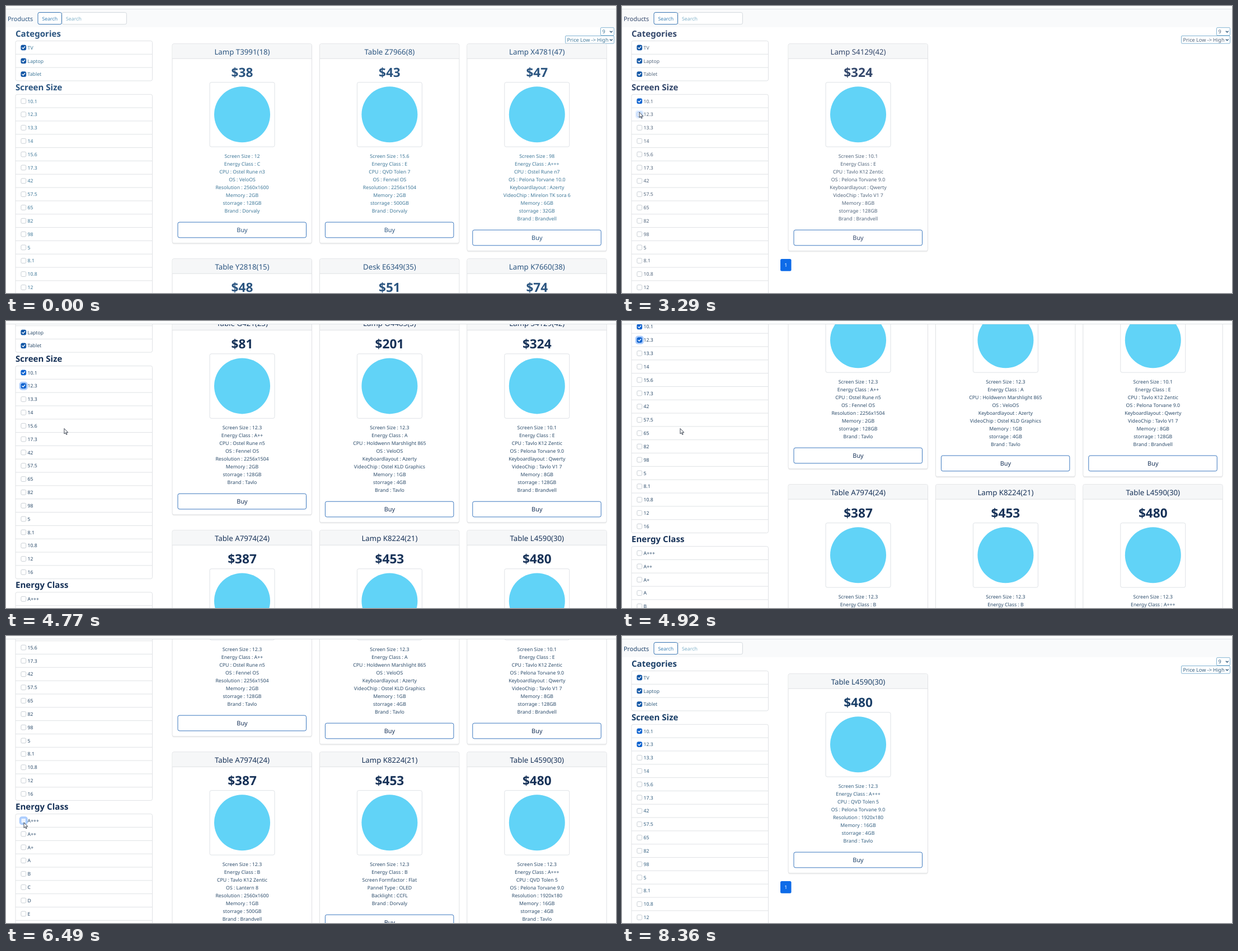
An HTML page for the animation above (9440 ms loop, 1090x514 px).

```html
<!DOCTYPE html>
<html lang="en">
<head>
<meta charset="utf-8">
<title>Product filter</title>
<style>
html, body { margin: 0; width: 100%; height: 100%; overflow: hidden; background: #fff; }
svg { display: block; width: 1090px; height: 514px; }
text { font-family: "Noto Sans", "Open Sans", sans-serif; fill: var(--small); text-rendering: geometricPrecision; }
.title { font-size: 13.25px; fill: var(--main); }
.price { font-size: 22.6px; font-weight: 600; fill: var(--main); }
.spec { font-size: 8.75px; }
.buy { font-size: 10.9px; fill: var(--main); }
.head { font-size: 15.1px; font-weight: 600; fill: var(--main); }
.label { font-size: 8.7px; }
.brand { font-size: 10.9px; fill: var(--main); }
.nav { font-size: 8.8px; fill: #3d82b6; }
.hint { font-size: 8.8px; fill: #7fb0c8; }
.pick { font-size: 9.15px; }
.page { font-size: 8.8px; fill: #fff; }
.mid { text-anchor: middle; }
</style>
</head>
<body>
<svg id="stage" viewBox="0 0 1090 514" xmlns="http://www.w3.org/2000/svg"></svg>
<script>
const NS = 'http://www.w3.org/2000/svg';
const LOOP = 9440;
const ROW = 23.83;
const LINE = 13.97;
const stage = document.getElementById('stage');

function add(parent, tag, attrs = {}, text) {
  const el = document.createElementNS(NS, tag);
  for (const key in attrs) el.setAttribute(key, attrs[key]);
  if (text !== undefined) el.textContent = text;
  parent.appendChild(el);
  return el;
}
const group = parent => add(parent, 'g');
const box = (parent, x, y, width, height, more) =>
  add(parent, 'rect', { x, y, width, height, fill: '#fff', ...more });
const write = (parent, cls, x, y, text) => add(parent, 'text', { class: cls, x, y }, text);
const show = (el, on) => el.setAttribute('visibility', on ? 'inherit' : 'hidden');

// Each product: title, price, spec lines
const S4129 = ['Lamp S4129(42)', 324, 'Screen Size : 10.1|Energy Class : E|CPU : Tavlo K12 Zentic|OS : Pelona Torvane 9.0|Keyboardlayout : Qwerty|VideoChip : Tavlo V1 7|Memory : 8GB|storrage : 128GB|Brand : Brandvell'];
const L4590 = ['Table L4590(30)', 480, 'Screen Size : 12.3|Energy Class : A+++|CPU : QVD Tolen 5|OS : Pelona Torvane 9.0|Resolution : 1920x180|Memory : 16GB|storrage : 4GB|Brand : Tavlo'];
const SCENES = [
  [
    ['Lamp T3991(18)', 38, 'Screen Size : 12|Energy Class : C|CPU : Ostel Rune n3|OS : VeloOS|Resolution : 2560x1600|Memory : 2GB|storrage : 128GB|Brand : Dorvaly'],
    ['Table Z7966(8)', 43, 'Screen Size : 15.6|Energy Class : E|CPU : QVD Tolen 7|OS : Fennel OS|Resolution : 2256x1504|Memory : 2GB|storrage : 500GB|Brand : Dorvaly'],
    ['Lamp X4781(47)', 47, 'Screen Size : 98|Energy Class : A+++|CPU : Ostel Rune n7|OS : Pelona Torvane 10.0|Keyboardlayout : Azerty|VideoChip : Mirelon TK sora 6|Memory : 6GB|storrage : 32GB|Brand : Brandvell'],
    ['Table Y2818(15)', 48, ''],
    ['Desk E6349(35)', 51, ''],
    ['Lamp K7660(38)', 74, '']
  ],
  [S4129],
  [
    ['Table G421(23)', 81, 'Screen Size : 12.3|Energy Class : A++|CPU : Ostel Rune n5|OS : Fennel OS|Resolution : 2256x1504|Memory : 2GB|storrage : 128GB|Brand : Tavlo'],
    ['Lamp O4485(3)', 201, 'Screen Size : 12.3|Energy Class : A|CPU : Holdwenn Marshlight 865|OS : VeloOS|Keyboardlayout : Azerty|VideoChip : Ostel KLD Graphics|Memory : 1GB|storrage : 4GB|Brand : Tavlo'],
    S4129,
    ['Table A7974(24)', 387, 'Screen Size : 12.3|Energy Class : B|CPU : Tavlo K12 Zentic|OS : Lantern 8|Resolution : 2560x1600|Memory : 1GB|storrage : 500GB|Brand : Brandvell'],
    ['Lamp K8224(21)', 453, 'Screen Size : 12.3|Energy Class : B|Screen Formfactor : Flat|Pannel Type : OLED|Backlight : CCFL|Brand : Dorvaly'],
    L4590
  ],
  [L4590]
];
const THEMES = [
  ['#2b5580', '#3f7899'],
  ['#33476b', '#52667d'],
  ['#173258', '#2c4c6b'],
  ['#1b4069', '#335f80']
];

function drawCard(parent, [title, price, specs], x, y) {
  const lines = specs ? specs.split('|') : Array(9).fill('');
  const mid = x + 125;
  const height = 245.3 + lines.length * LINE;
  box(parent, x, y + 1.2, 249.5, height + .8, { rx: 3, fill: '#000', opacity: .06 });
  box(parent, x, y, 249.5, height, { rx: 3, stroke: '#dfe1e4' });
  add(parent, 'path', { d: `M${x + .5} ${y + 26.5}V${y + 3}q0-2.5 2.5-2.5h243.5q2.5 0 2.5 2.5v23.5z`, fill: '#f6f7f8' });
  add(parent, 'path', { d: `M${x} ${y + 26.5}h249.5`, stroke: '#dfe1e4' });
  write(parent, 'title mid', mid, y + 19, title);
  write(parent, 'price mid', mid, y + 59, '$' + price);
  box(parent, x + 67, y + 69, 116, 115.5, { rx: 3, stroke: '#dee2e6' });
  add(parent, 'circle', { cx: mid, cy: y + 126.6, r: 50, fill: '#61d3f7' });
  lines.forEach((line, i) => write(parent, 'spec mid', mid, y + 204.2 + i * LINE, line));
  const top = y + 207.7 + lines.length * LINE;
  box(parent, x + 10, top, 229.5, 27.7, { rx: 3, stroke: '#3c78bf' });
  write(parent, 'buy mid', mid, top + 17.9, 'Buy');
  return y + height;
}

function drawScene(cards) {
  const g = group(page);
  let bottom = 0;
  cards.forEach((card, i) => {
    bottom = drawCard(g, card, 297 + i % 3 * 263.4, 67.7 + Math.floor(i / 3) * 385);
  });
  if (cards.length === 1) {
    box(g, 283, bottom + 14.3, 19.5, 21.7, { rx: 2.5, fill: '#0d6be8' });
    write(g, 'page mid', 292.7, bottom + 28.5, '1');
  }
  return g;
}

function drawCheck(parent, y) {
  const g = add(parent, 'g', { transform: `translate(26.6 ${y - 4.7})` });
  const ring = box(g, -1.5, -1.5, 12.4, 12.4, { rx: 3.5, fill: 'none', stroke: '#a9cbfd', 'stroke-width': 2.6 });
  const frame = box(g, .3, .3, 8.8, 8.8, { rx: 2, stroke: '#c3cad1', 'stroke-width': .9 });
  const tick = add(g, 'path', { d: 'M2.3 4.9L4.1 6.6L7.1 3', fill: 'none', stroke: '#fff', 'stroke-width': 1.4, 'stroke-linecap': 'round', 'stroke-linejoin': 'round' });
  return (on, focus, color = '#0d62d0') => {
    ring.setAttribute('opacity', focus);
    frame.setAttribute('fill', on ? color : focus > 0 ? '#edf4ff' : '#fff');
    frame.setAttribute('stroke', on ? color : focus > 0 ? '#86b7fe' : '#c3cad1');
    show(tick, on);
  };
}

function drawList(name, baseline, top, items) {
  write(page, 'head', 17, baseline, name);
  box(page, 17, top, 244.5, items.length * ROW, { rx: 3, stroke: '#dfe2e5' });
  return items.map((item, i) => {
    const y = top + i * ROW;
    if (i) add(page, 'path', { d: `M17 ${y}h244.5`, stroke: '#dfe2e5' });
    write(page, 'label', 38.6, y + 15.2, item);
    return drawCheck(page, y + 12);
  });
}

function drawSelect(x, y, width, height, text) {
  box(page, x, y, width, height, { rx: 1.5, stroke: '#82b3d2' });
  write(page, 'pick', x + 3, y + 10.7, text);
  add(page, 'path', { d: `M1079 ${y + 6}l2.3 2.4l2.3-2.4`, fill: 'none', stroke: '#234f74', 'stroke-width': 1.3 });
}

const page = group(stage);
box(page, 0, 6, 1090, 32, { fill: '#f9fafb' });
write(page, 'brand', 3, 26.5, 'Products');
box(page, 100, 11.5, 115.5, 21.3, { rx: 3, stroke: '#d3d9de' });
box(page, 57, 11.5, 42.5, 21.3, { rx: 3, stroke: '#3674b3' });
write(page, 'nav mid', 78.3, 25.6, 'Search');
write(page, 'hint', 107, 25.6, 'Search');
drawSelect(1062.5, 38.7, 24, 14, '9');
drawSelect(999.5, 53.5, 87, 13.6, 'Price Low -> High');

const kinds = drawList('Categories', 54.5, 62.5, ['TV', 'Laptop', 'Tablet']);
const sizes = drawList('Screen Size', 150.5, 158.3,
  '10.1 12.3 13.3 14 15.6 17.3 42 57.5 65 82 98 5 8.1 10.8 12 16'.split(' '));
const grades = drawList('Energy Class', 555.8, 563.7, 'A+++ A++ A+ A B C D E F G'.split(' '));
const scenes = SCENES.map(drawScene);

box(stage, 0, 0, 1090, 5.5, { fill: '#fcfdfd' });
add(stage, 'path', { d: 'M0 5.5H1090', stroke: '#dfe3e6' });
const cursor = add(stage, 'path', {
  d: 'M0 0V9.6L2.2 7.6L3.7 11L5.2 10.4L3.7 7.1H6.8Z',
  fill: '#fff', stroke: '#26303f', 'stroke-width': .9, 'stroke-linejoin': 'round'
});

const CLICKS = [1260, 3290, 6240];
const SCROLL = [[4600, 0], [4680, 28], [4920, 159.6], [5000, 195], [5080, 225], [5200, 245],
  [7080, 245], [7250, 150], [7420, 62], [7500, 23.7], [7580, 7], [7650, 0]];
const MOVES = [[160, 840, 437], [400, 560, 285], [640, 230, 165], [800, 70, 138], [940, 25, 155],
  [1030, 29, 168], [1110, 30, 169], [2490, 30, 169], [2570, 31, 184], [2960, 31, 184],
  [3060, 31, 190], [4210, 31, 191], [4300, 58, 207], [4450, 104, 192.5], [5150, 104, 192.5],
  [5550, 44, 335], [5770, 44, 335], [5860, 32, 334], [6880, 32, 334], [7200, 247, 310],
  [8060, 247, 310], [8130, 310, 328], [8300, 912, 497]];

// Linear value at time t on a list of [time, ...values]
function at(keys, t, k = 1) {
  const i = keys.findIndex(key => key[0] > t);
  if (i === 0) return keys[0][k];
  if (i < 0) return keys[keys.length - 1][k];
  const a = keys[i - 1], b = keys[i];
  return a[k] + (b[k] - a[k]) * (t - a[0]) / (b[0] - a[0]);
}

function render(t) {
  const scene = CLICKS.filter(c => t >= c + 350).length;
  scenes.forEach((g, i) => show(g, i === scene));
  stage.style.setProperty('--main', THEMES[scene][0]);
  stage.style.setProperty('--small', THEMES[scene][1]);

  const targets = [sizes[0], sizes[1], grades[0]];
  kinds.forEach(set => set(true, 0, '#1357a6'));
  sizes.concat(grades).forEach(set => set(false, 0));
  targets.forEach((set, i) => {
    const since = t - CLICKS[i];
    const focused = since >= 0 && !(t >= CLICKS[i + 1]);
    set(since >= 300, focused ? Math.min(1, .3 + since / 200) : 0);
  });

  page.setAttribute('transform', `translate(0 ${-at(SCROLL, t)})`);
  show(cursor, t >= 160 && t < 8350);
  cursor.setAttribute('transform', `translate(${at(MOVES, t)} ${at(MOVES, t, 2)})`);
}

const start = performance.now();
function tick() {
  render((performance.now() - start) % LOOP);
  requestAnimationFrame(tick);
}
tick();
</script>
</body>
</html>
```
